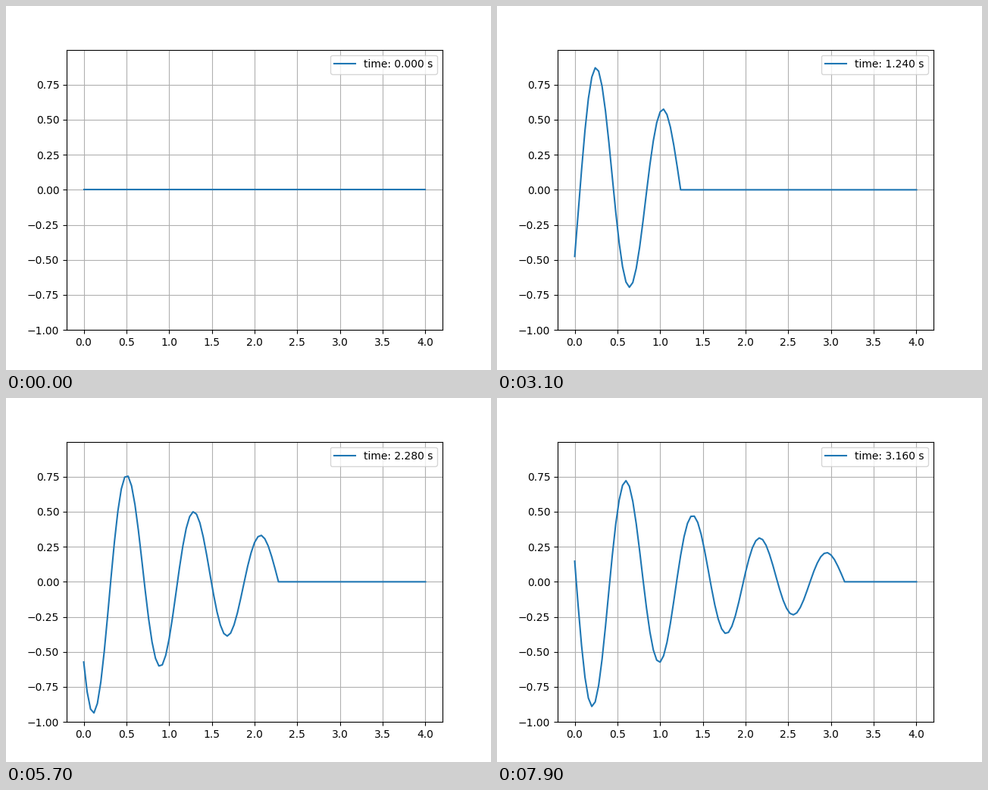
Write a matplotlib script that moves like this. It is 640 by 480 pixels and loops after 8000 ms.

```python
import matplotlib.pyplot as plt
import numpy as np
from matplotlib.animation import FuncAnimation

STEP = 0.04      # grid spacing in space and time, wave speed 1
DAMPING = 1.1
OMEGA = 8.0
FRAMES = 80

x = np.arange(101) * STEP


def solve():
    """Damped wave equation, driven at the left end, leapfrog scheme."""
    a = DAMPING * STEP / 2
    u = np.zeros((FRAMES, x.size))
    u[:, 0] = np.sin(OMEGA * STEP * np.arange(FRAMES))
    for n in range(1, FRAMES - 1):
        neighbours = u[n, :-2] + u[n, 2:]
        u[n + 1, 1:-1] = (neighbours - (1 - a) * u[n - 1, 1:-1]) / (1 + a)
    return u


wave = solve()

fig, ax = plt.subplots(figsize=(6.4, 4.8), dpi=100)
line, = ax.plot(x, wave[0], label="time: 0.000 s")
ax.set_xlim(-0.2, 4.2)
ax.set_ylim(-1, 0.9996)
ax.grid(True)
label = ax.legend(loc="upper right").get_texts()[0]


def update(i):
    line.set_ydata(wave[i])
    label.set_text(f"time: {i * STEP:.3f} s")
    return line, label


anim = FuncAnimation(fig, update, frames=FRAMES, interval=100,
                     repeat=True, repeat_delay=0, blit=False)
plt.show()
```
